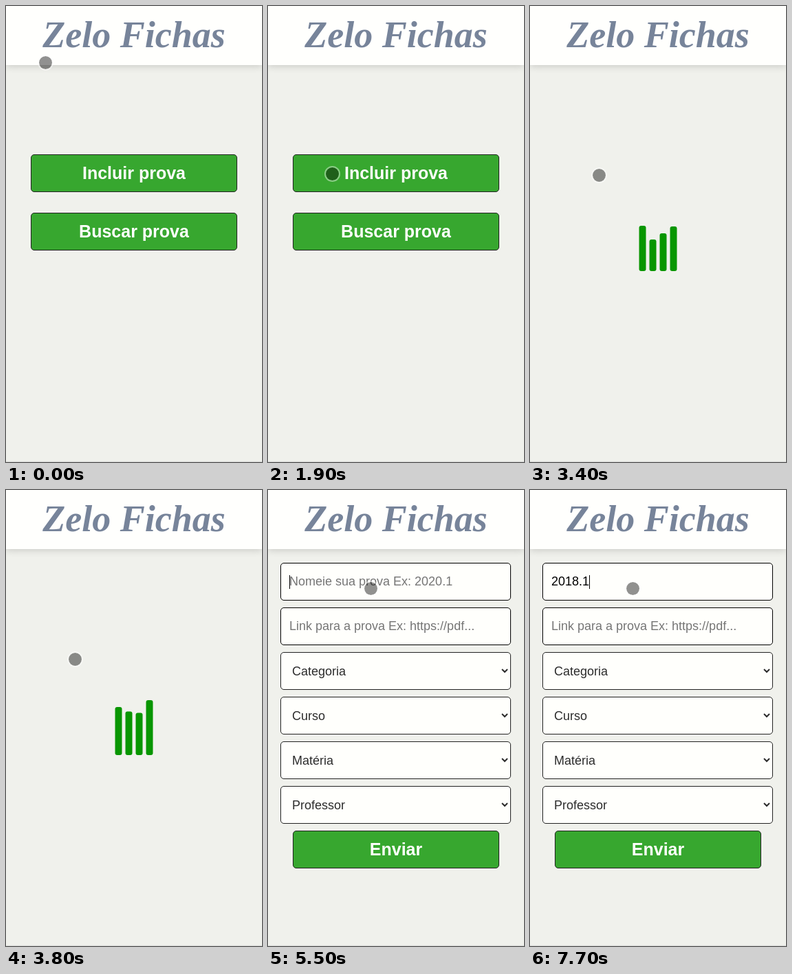
An HTML page for the animation above (8 s loop, 372 px wide and 664 px high).

```html
<!DOCTYPE html>
<html lang="pt-BR">
<head>
<meta charset="utf-8">
<title>Zelo Fichas</title>
<style>
  html, body { margin: 0; width: 100%; height: 100%; overflow: hidden; background: #f0f1ec; }
  header, main, section, svg, #caret { position: absolute; }
  header {
    top: 0; left: 0; width: 372px; height: 86px; line-height: 84px; text-align: center;
    background: #fffffd; box-shadow: 0 2px 10px rgba(0, 0, 0, .16);
    font-family: "Liberation Serif", "Times New Roman", serif;
    font-size: 54px; font-style: italic; font-weight: bold; color: #77849a;
  }
  main {
    top: 0; left: 0; box-sizing: border-box; width: 372px; height: 664px;
    border-bottom: 1px solid #dcdcda;
  }
  button, input, select {
    display: block; box-sizing: border-box; width: 335px; height: 55px;
    margin: 0 0 10px; padding: 0 12px; border: 1px solid #222; border-radius: 5px;
    background: #fffffc; color: #2c2c2c;
    font-family: "Liberation Sans", Arial, sans-serif; font-size: 18px;
  }
  input { border-color: #000; color: #000; }
  button { width: 300px; background: #37a72f; color: #fffffd; font-size: 25px; font-weight: bold; }
  #menu { top: 216px; left: 36px; }
  #menu button { margin-bottom: 30px; }
  #form { top: 106px; left: 18px; }
  #form button { margin-left: 18px; }
  #caret { top: 18px; left: 13px; width: 1px; height: 20px; background: #000; }
  svg { top: 0; left: 0; }
  #loader { fill: #089600; }
  #cursor { fill: rgba(0, 0, 0, .43); }
  #cursor .ring { fill: none; stroke: rgba(255, 255, 255, .42); stroke-width: 2; }
</style>
</head>
<body>
<header>Zelo Fichas</header>
<main inert>
  <section id="menu">
    <button>Incluir prova</button>
    <button>Buscar prova</button>
  </section>
  <section id="form">
    <input id="name" placeholder="Nomeie sua prova Ex: 2020.1">
    <input placeholder="Link para a prova Ex: https://pdf...">
    <select><option>Categoria</option></select>
    <select><option>Curso</option></select>
    <select><option>Matéria</option></select>
    <select><option>Professor</option></select>
    <button>Enviar</button>
    <div id="caret"></div>
  </section>
</main>
<svg width="372" height="664">
  <g id="loader"></g>
  <g id="cursor"><circle r="9.5"/><circle class="ring" r="10.5"/></g>
</svg>
<script>
const LOOP = 8000, STEP = 100;
const LOADER_START = 2600, FORM_START = 3900, CARET_START = 5500;
const BASELINE = 386, MAX_HEIGHT = 80;

const origin = { x: 57.5, y: 82.5 };
const moves = [
  { from: 600, to: 1000, x: 81.5, y: 116.5 },
  { from: 1100, to: 1300, x: 83.5, y: 163.5 },
  { from: 1400, to: 1900, x: 93.5, y: 244.5 },
  { from: 2400, to: 2600, x: 97.5, y: 248.5 },
  { from: 2600, to: 3400, x: 100.5, y: 246.5 },
  { from: 3900, to: 4200, x: 150, y: 190.5 },
  { from: 4300, to: 4400, x: 149.5, y: 143.5 }
];

const answer = "2018.1";
const keyTimes = [6200, 6200, 6500, 6600, 7500, 7700];

// Each bar drifts from one height to another while swinging in half waves.
const bars = [
  { first: 28, last: 66, swing: 15, halfWaves: 1 },
  { first: 71, last: 46, swing: 30, halfWaves: 3 },
  { first: 42, last: 55, swing: -25, halfWaves: 6 },
  { first: 35, last: 65, swing: 25, halfWaves: 4 }
];

const byId = id => document.getElementById(id);
const menu = byId("menu"), form = byId("form"), nameInput = byId("name"), caret = byId("caret");
const loader = byId("loader"), cursor = byId("cursor");

bars.forEach((bar, i) => {
  bar.node = document.createElementNS(loader.namespaceURI, "rect");
  bar.node.setAttribute("x", 158.5 + 15 * i);
  bar.node.setAttribute("width", 10);
  bar.node.setAttribute("rx", 3);
  loader.append(bar.node);
});

const ruler = document.createElement("canvas").getContext("2d");
ruler.font = '18px "Liberation Sans", Arial, sans-serif';

const mix = (a, b, p) => a + (b - a) * p;
const show = (node, visible) => { node.style.display = visible ? "" : "none"; };

function cursorAt(t) {
  let { x, y } = origin;
  for (const move of moves) {
    const p = Math.min(1, Math.max(0, (t - move.from) / (move.to - move.from)));
    x = mix(x, move.x, p);
    y = mix(y, move.y, p);
  }
  return { x, y };
}

function barHeight({ first, last, swing, halfWaves }, p) {
  return Math.min(MAX_HEIGHT, mix(first, last, p) + swing * Math.sin(Math.PI * halfWaves * p));
}

function render(time) {
  const t = Math.floor((time % LOOP) / STEP) * STEP;
  show(menu, t < LOADER_START);
  show(loader, t >= LOADER_START && t < FORM_START);
  show(form, t >= FORM_START);

  for (const bar of bars) {
    const height = Math.max(0, barHeight(bar, (t - LOADER_START) / 800));
    bar.node.setAttribute("y", BASELINE - height);
    bar.node.setAttribute("height", height);
  }

  const { x, y } = cursorAt(t);
  cursor.setAttribute("transform", `translate(${x} ${y})`);

  const typed = answer.slice(0, keyTimes.filter(key => key <= t).length);
  if (nameInput.value !== typed) nameInput.value = typed;
  show(caret, t >= CARET_START);
  caret.style.transform = `translateX(${Math.round(ruler.measureText(typed).width)}px)`;
}

const start = performance.now();
function tick() {
  render(performance.now() - start);
  requestAnimationFrame(tick);
}
tick();
</script>
</body>
</html>
```
